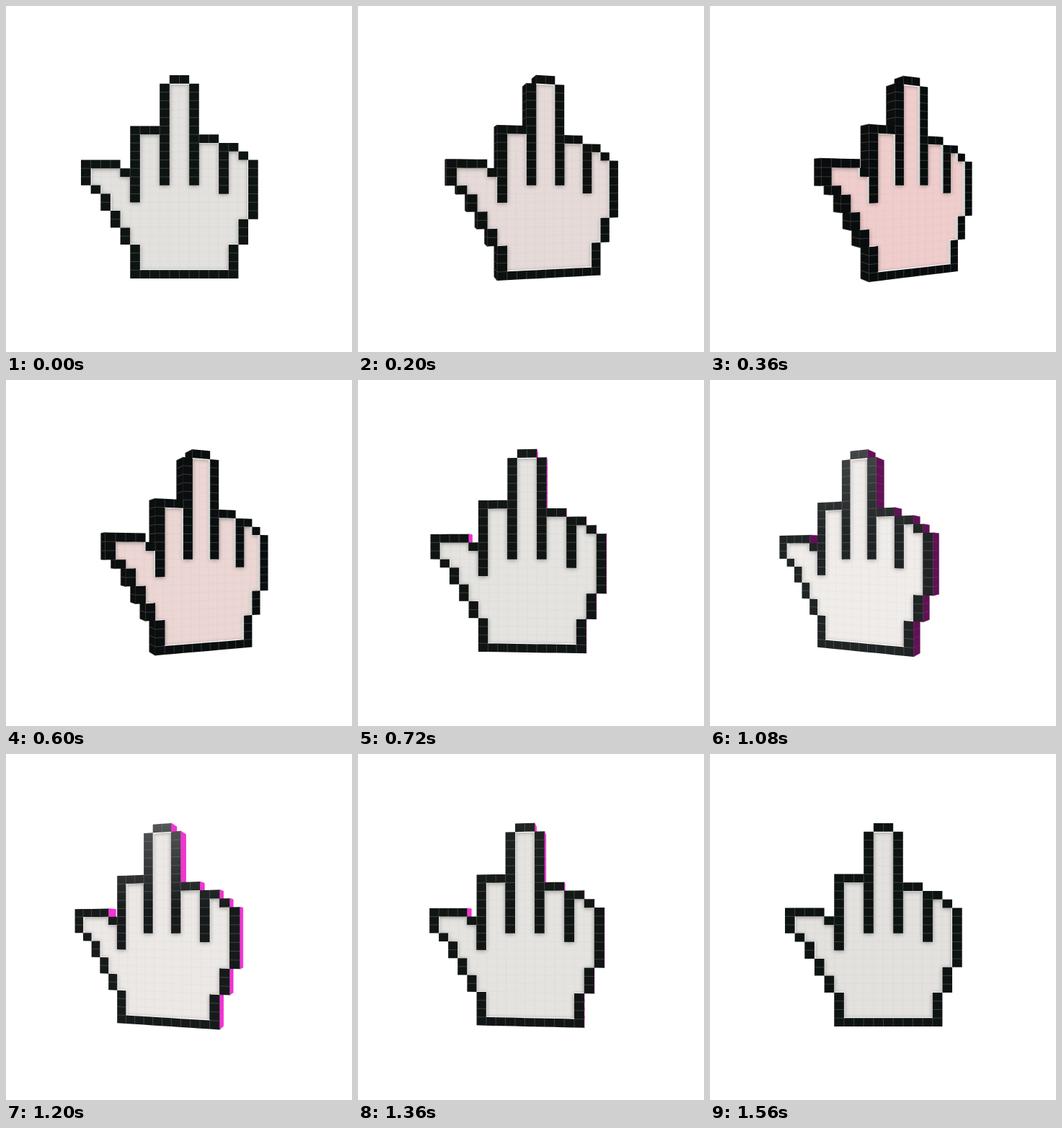
Animation, 480 px wide and 480 px high, one loop 1.6 s. Source, as an HTML page with a canvas:

```html
<!DOCTYPE html>
<html lang="en">
<head>
<meta charset="utf-8">
<title>Pixel hand</title>
<style>
html, body { margin: 0; width: 100%; height: 100%; overflow: hidden; background: #fff; }
canvas { display: block; width: 480px; height: 480px; }
</style>
</head>
<body>
<canvas id="stage" width="480" height="480"></canvas>
<script>
const ctx = document.getElementById('stage').getContext('2d');
const LOOP = 1600, STEP = 40;
const COLS = 18, ROWS = 24, CW = 13.65, CH = 11.75;
const LEFT = 104 - 240, TOP = 96 - 240;
const CAMERA = 650, PIVOT = 82, DEPTH = 25, RECESS = 6;

// Outline blocks: column, row, width, height
const bars = [
  [9, 0, 2, 1], [8, 1, 1, 12], [11, 1, 1, 12], [5, 6, 3, 1], [5, 6, 1, 9],
  [12, 7, 2, 1], [14, 8, 2, 1], [14, 8, 1, 6], [16, 9, 1, 1], [17, 10, 1, 7],
  [16, 17, 1, 3], [15, 20, 1, 4], [5, 23, 11, 1], [5, 20, 1, 4], [4, 18, 1, 2],
  [3, 16, 1, 2], [2, 14, 1, 2], [1, 13, 1, 1], [0, 10, 1, 3], [0, 10, 4, 1], [4, 11, 1, 1]
];
const EMPTY = 0, INK = 1, SKIN = 2;
const grid = Array.from({ length: ROWS }, () => new Array(COLS).fill(EMPTY));
for (const [c, r, w, h] of bars)
  for (let y = r; y < r + h; y++) grid[y].fill(INK, c, c + w);
grid.forEach((row, r) => {
  for (let c = row.indexOf(INK); c < row.lastIndexOf(INK); c++)
    if (!row[c] && !(r === 10 && c === 4)) row[c] = SKIN;
});
const at = (c, r) => (grid[r] && grid[r][c]) || EMPTY;
const cellsOf = kind => {
  const list = [];
  for (let c = 0; c < COLS; c++)
    for (let r = 0; r < ROWS; r++) if (at(c, r) === kind) list.push([c, r]);
  return list;
};
const ink = cellsOf(INK), skin = cellsOf(SKIN);

// Time in ms, angle in degrees
const swing = [[0, 0], [430, 31.5], [500, 31], [900, -30], [1560, 0], [1600, 0]];
// Angle, colour
const skinTones = [[-30, [242, 239, 236]], [-16, [234, 231, 228]], [0, [226, 225, 222]],
  [14.5, [229, 218, 216]], [22, [235, 214, 211]], [30, [239, 204, 203]]];
const inkTones = [[-30, [38, 43, 44]], [-16, [22, 25, 26]], [0, [14, 20, 18]], [30, [9, 12, 12]]];
const tipTones = [[-30, [56, 60, 61]], [-16, [88, 89, 90]], [-4, [20, 26, 24]], [0, [14, 20, 18]], [30, [9, 12, 12]]];
const sideTones = [[-30, [48, 12, 44]], [-26, [70, 12, 62]], [-18, [245, 50, 212]], [0, [245, 50, 212]], [1, [12, 14, 14]]];

const mix = (a, b, k) => Array.isArray(a) ? a.map((v, i) => mix(v, b[i], k)) : a + (b - a) * k;
function lookup(table, x, ease = k => k) {
  if (x <= table[0][0]) return table[0][1];
  for (let i = 1; i < table.length; i++) {
    const [x0, v0] = table[i - 1], [x1, v1] = table[i];
    if (x <= x1) return mix(v0, v1, ease((x - x0) / (x1 - x0)));
  }
  return table[table.length - 1][1];
}
const rgb = c => `rgb(${c.map(Math.round).join(',')})`;
const sine = k => (1 - Math.cos(Math.PI * k)) / 2;

function draw(t) {
  const deg = lookup(swing, t, sine);
  const sin = Math.sin(deg * Math.PI / 180), cos = Math.cos(deg * Math.PI / 180);

  // Grid position at a depth behind the front face
  const project = (c, r, back = 0) => {
    const x = LEFT + c * CW, y = TOP + r * CH, z = PIVOT - back;
    const s = CAMERA / (CAMERA - (z * cos - x * sin - PIVOT));
    return [240 + (x * cos + z * sin) * s, 240 + y * s];
  };
  const addQuad = (path, pts) => {
    pts.forEach((p, i) => i ? path.lineTo(...p) : path.moveTo(...p));
    path.closePath();
  };
  const faces = (cells, back) => {
    const path = new Path2D();
    for (const [c, r] of cells)
      addQuad(path, [project(c, r, back), project(c + 1, r, back),
        project(c + 1, r + 1, back), project(c, r + 1, back)]);
    return path;
  };
  const wall = (c, r, back) => {
    const path = new Path2D();
    addQuad(path, [project(c, r), project(c, r, back), project(c, r + 1, back), project(c, r + 1)]);
    return path;
  };
  const seams = (cells, kind, back) => {
    const path = new Path2D();
    const line = (a, b) => { path.moveTo(...a); path.lineTo(...b); };
    for (const [c, r] of cells) {
      if (at(c + 1, r) === kind) line(project(c + 1, r, back), project(c + 1, r + 1, back));
      if (at(c, r + 1) === kind) line(project(c, r + 1, back), project(c + 1, r + 1, back));
    }
    return path;
  };

  ctx.fillStyle = '#fff';
  ctx.fillRect(0, 0, 480, 480);

  // Outer sides, far columns first
  const dir = deg > 0 ? -1 : 1, edge = deg > 0 ? 0 : 1;
  if (Math.abs(deg) > 0.2) {
    const tone = rgb(lookup(sideTones, deg));
    ctx.lineWidth = 0.6;
    for (const [c, r] of deg > 0 ? [...ink].reverse() : ink) {
      if (at(c + dir, r) !== EMPTY) continue;
      const side = wall(c + edge, r, DEPTH);
      ctx.fillStyle = tone;
      ctx.fill(side);
      ctx.strokeStyle = tone;
      ctx.stroke(side);
      ctx.strokeStyle = deg > 0 ? 'rgba(150,155,155,.4)' : 'rgba(160,60,140,.3)';
      ctx.stroke(side);
    }
  }

  // Recessed surface
  const surface = faces(skin, RECESS);
  ctx.fillStyle = rgb(lookup(skinTones, deg));
  ctx.fill(surface);
  ctx.lineWidth = 0.6;
  ctx.strokeStyle = 'rgba(90,70,65,.06)';
  ctx.stroke(seams(skin, SKIN, RECESS));

  // Inner walls
  if (Math.abs(deg) > 0.2) {
    ctx.fillStyle = deg > 0 ? '#d2d3d0' : '#dcdad7';
    for (const [c, r] of ink)
      if (at(c + dir, r) === SKIN) ctx.fill(wall(c + edge, r, RECESS));
  }

  // Soft shadow of the outline, kept on the surface
  const front = faces(ink, 0);
  ctx.save();
  ctx.clip(surface);
  ctx.shadowColor = 'rgba(50,50,48,.5)';
  ctx.shadowBlur = 6;
  ctx.shadowOffsetY = 1;
  ctx.fillStyle = '#111';
  ctx.fill(front);
  ctx.restore();

  const shade = ctx.createLinearGradient(0, 96, 0, 215);
  shade.addColorStop(0, rgb(lookup(tipTones, deg)));
  shade.addColorStop(1, rgb(lookup(inkTones, deg)));
  ctx.fillStyle = shade;
  ctx.fill(front);
  ctx.lineWidth = 0.7;
  ctx.strokeStyle = 'rgba(160,168,164,.42)';
  ctx.stroke(seams(ink, INK, 0));
}

function tick() {
  draw(Math.floor(performance.now() % LOOP / STEP) * STEP);
  requestAnimationFrame(tick);
}
tick();
</script>
</body>
</html>
```
